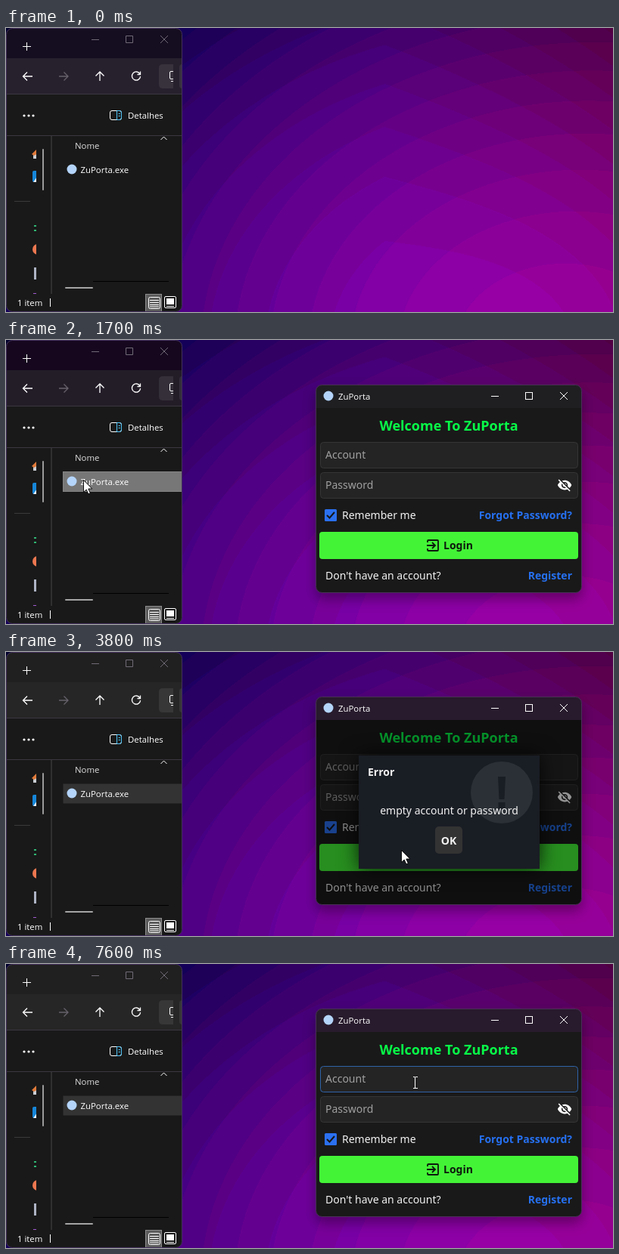
Animation of 802 by 376 pixels, one loop 8000 ms. Source, as an HTML page with a canvas:

```html
<!DOCTYPE html>
<html lang="en">
<head>
<meta charset="utf-8">
<title>Login demo</title>
<style>
html, body { margin: 0; width: 100%; height: 100%; overflow: hidden; background: #28005c; }
canvas, svg { position: absolute; left: 0; top: 0; width: 802px; height: 376px; }
text { font: 14px "Noto Sans", sans-serif; fill: #f2f2f2; }
.ui { font: 11.4px "Open Sans", sans-serif; fill: #fff; }
.b { font-weight: 700; }
.link { font-weight: 700; fill: #2670f0; text-anchor: end; }
.mid { text-anchor: middle; }
.hint { fill: #a0a0a0; }
.line { fill: none; stroke: #fff; }
.field { fill: #242424; stroke: #353535; }
#login { filter: drop-shadow(0 8px 8px #0005); }
#box { filter: drop-shadow(0 0 13px #000c); }
</style>
</head>
<body>
<canvas id="bg" width="802" height="376"></canvas>
<svg viewBox="0 0 802 376">
  <defs>
    <clipPath id="frame"><rect x=".5" y=".5" width="232" height="375" rx="8"/></clipPath>
    <clipPath id="side"><rect y="143" width="40" height="209"/></clipPath>
    <clipPath id="chip"><rect x="202" y="48" width="19" height="32"/></clipPath>
    <clipPath id="pane"><rect x="409.5" y="59.5" width="351" height="275" rx="8"/></clipPath>
    <clipPath id="btnClip"><rect x="414" y="254" width="342" height="36" rx="4"/></clipPath>
  </defs>

  <g clip-path="url(#frame)">
    <rect width="233" height="376" fill="#191919"/>
    <rect id="tabs" width="233" height="40"/>
    <rect id="bar" y="40" width="233" height="48"/>
    <path d="M0 87.5H233M0 142.5H233" stroke="#3b3740"/>
    <path class="line" d="M22 24.5H33M27.500 19V30"/>
    <path id="winBtns" class="line" d="M113 15.500H123M158.500 10.500H167.500V19.500H158.500ZM204 10L214 20M214 10L204 20"/>
    <g class="line" stroke-width="1.3">
      <path d="M35 64H22.500M28 58.500L22.500 64L28 69.500M124 70V58M118.500 63.500L124 58L129.500 63.500"/>
      <path d="M70 64H82M76.500 58.500L82 64L76.500 69.500" stroke="#66616b"/>
      <path d="M177 61A5.600 5.600 0 1 0 177.600 64M177.500 57.500V61.500H173.500"/>
    </g>
    <g fill="#fff" fill-opacity=".08">
      <path d="M207 48H221V80H207Q202 80 202 75V53Q202 48 207 48Z"/>
      <rect x="229" y="48" width="9" height="32" rx="4"/>
    </g>
    <path class="line" clip-path="url(#chip)" d="M224 57.500H218Q216.500 57.500 216.500 59V66Q216.500 67.500 218 67.500H224M218 70.500H224" stroke="#ddd"/>
    <g fill="#fff"><circle cx="24" cy="116" r="1.600"/><circle cx="30" cy="116" r="1.600"/><circle cx="36" cy="116" r="1.600"/></g>
    <rect class="line" x="137.500" y="109.500" width="15" height="12" rx="2.500" stroke="#d8e6ee"/>
    <path d="M146.500 109.500H150Q152.500 109.500 152.500 112V119Q152.500 121.500 150 121.500H146.500ZM148.500 113.500H151M148.500 116.500H151" fill="none" stroke="#4cc2f5"/>
    <text class="ui" x="161" y="120">Detalhes</text>
    <text class="ui" x="91" y="160" style="fill:#dedede">Nome</text>
    <path class="line" d="M204.500 148L208.500 144L212.500 148" stroke="#aaa"/>
    <rect x="59" y="143" width="2" height="209" fill="#303030"/>
    <g clip-path="url(#side)">
      <path d="M36 165H44V173H36Z" fill="#c9ccd2"/>
      <path d="M34 167L42 159V166L37 169Z" fill="#e07a3a"/>
      <rect x="35" y="189" width="12" height="15" rx="2" fill="#1687d9"/>
      <path d="M36 204L41 197V204Z" fill="#e9f4ff"/>
      <path d="M37 261H40V263H37ZM37 267H40V269H37Z" fill="#2fb573"/>
      <circle cx="42" cy="293" r="7" fill="#ec7750"/>
      <rect x="37" y="317" width="6" height="16" fill="#aeb4c4"/>
      <rect x="36" y="351" width="6" height="4" fill="#a05bd0"/>
    </g>
    <path d="M11 229.500H32" stroke="#3a3a3a"/>
    <rect x="48" y="160" width="2" height="55" rx="1" fill="#9a9a9a"/>
    <rect x="78" y="343" width="37" height="2" rx="1" fill="#a5a5a5"/>
    <path d="M115 335.500H215" stroke="#000"/>
    <rect id="row" x="75.500" y="174.500" width="160" height="26"/>
    <circle cx="87" cy="187" r="6.500" fill="#b4d4fa"/>
    <text class="ui" x="98.500" y="192">ZuPorta.exe</text>
    <text class="ui" x="15" y="368">1 item</text>
    <path class="line" d="M58.500 358V369"/>
    <rect x="184.500" y="352.500" width="21" height="23" fill="#5c5c5c" stroke="#8c8c8c"/>
    <rect class="line" x="188.500" y="356.500" width="15" height="15" rx="2"/>
    <path class="line" d="M190 360.500H202M190 363.500H202M190 366.500H202M190 369H202"/>
    <rect class="line" x="209.500" y="355.500" width="15" height="15" rx="1.500"/>
    <rect x="212" y="358" width="10" height="8" fill="#fff"/>
    <path class="line" d="M212 368.500H222" stroke="#999"/>
  </g>
  <rect x=".5" y=".5" width="232" height="375" rx="8" fill="none" stroke="#43305c"/>

  <g id="login">
    <g clip-path="url(#pane)">
      <rect x="409" y="59" width="352" height="276" fill="#191919"/>
      <rect id="caption" x="409" y="59" width="352" height="31"/>
      <circle cx="426" cy="74" r="6.500" fill="#b4d4fa"/>
      <text class="ui" x="439" y="79">ZuPorta</text>
      <path class="line" d="M641 74.500H651M732 69L742 79M742 69L732 79"/>
      <rect class="line" x="686.500" y="69.500" width="9" height="9" stroke="#5a5260"/>
      <text class="b mid" x="585" y="120" style="font-size:18px;fill:#08fa48">Welcome To ZuPorta</text>
      <rect id="account" class="field" x="415.500" y="135.500" width="340" height="34" rx="4"/>
      <rect class="field" x="415.500" y="175.500" width="340" height="34" rx="4"/>
      <text class="hint" x="422" y="157">Account</text>
      <text class="hint" x="422" y="197">Password</text>
      <rect id="caret" x="422" y="142" width="1" height="19" fill="#3a7cf0"/>
      <path transform="translate(728 182) scale(.84)" fill="#fff" d="M12 7c2.760 0 5 2.240 5 5 0 .65-.13 1.260-.36 1.830l2.920 2.920c1.510-1.260 2.700-2.890 3.430-4.750-1.730-4.390-6-7.500-11-7.500-1.400 0-2.740.25-3.980.7l2.160 2.160C10.740 7.130 11.350 7 12 7zM2 4.270l2.740 2.740C3.080 8.300 1.780 10.020 1 12c1.730 4.390 6 7.500 11 7.500 1.550 0 3.030-.3 4.380-.84L19.730 22 21 20.730 3.270 3zM7.530 9.800l1.550 1.550c-.05.21-.08.43-.08.65 0 1.660 1.340 3 3 3 .22 0 .44-.03.65-.08l1.550 1.550c-.67.33-1.410.53-2.200.53-2.760 0-5-2.240-5-5 0-.79.2-1.530.53-2.200zm4.310-.78l3.150 3.150.02-.16c0-1.660-1.340-3-3-3z"/>
      <rect x="421" y="224" width="16" height="16" rx="1.500" fill="#2b70f0"/>
      <path d="M424 232L427.500 235.500L434 228" fill="none" stroke="#151515" stroke-width="2"/>
      <text x="444" y="237">Remember me</text>
      <text class="link" x="748" y="237">Forgot Password?</text>
      <rect id="btn" x="414" y="254" width="342" height="36" rx="4"/>
      <circle id="ripple" cx="518" cy="270" fill="#fff" fill-opacity=".1" clip-path="url(#btnClip)"/>
      <path d="M557 268V266Q557 265 558 265H570Q571 265 571 266V278Q571 279 570 279H558Q557 279 557 278V276M556 272H566M563 268L567 272L563 276" fill="none" stroke="#0d1a0d" stroke-width="1.800"/>
      <text class="b" x="578" y="277" style="fill:#0d1a0d">Login</text>
      <text x="422" y="317">Don't have an account?</text>
      <text class="link" x="748" y="317">Register</text>
      <g id="dialog">
        <rect x="409" y="90" width="352" height="245" fill="#000" fill-opacity=".42"/>
        <rect id="box" x="466" y="137" width="239" height="150" fill="#191d24"/>
        <circle cx="655" cy="186" r="41" fill="#2b3036"/>
        <path d="M650 165H660L658.500 195H651.500ZM650.500 199H659.500V208H650.500Z" fill="#191d24"/>
        <text class="b" x="478" y="164">Error</text>
        <text class="mid" x="585.500" y="215">empty account or password</text>
        <rect x="567" y="231" width="36" height="36" rx="5" fill="#333"/>
        <text class="b mid" x="585" y="255">OK</text>
      </g>
    </g>
    <rect x="409.500" y="59.500" width="351" height="275" rx="8" fill="none" stroke="#4a3058"/>
  </g>

  <path id="arrow" d="M.5 .5V16.500L4.200 13L6.800 18.800L9.300 17.700L6.800 12H11.800Z" fill="#fff" stroke="#000" stroke-width=".9"/>
  <path id="beam" d="M-3 -7.500H-1L-.5 -7L0 -7.500H3M-.5 -7V7M-3 7.500H3" fill="none" stroke="#fff"/>
</svg>
<script>
const $ = id => document.getElementById(id);
const LOOP = 8000, STEP = 100;

// Wallpaper: a banded glow, bluer on the left and redder on the right
function paintWallpaper() {
  const ctx = $('bg').getContext('2d'), img = ctx.createImageData(802, 376);
  const band = (v, size) => Math.round(v / size) * size;
  for (let y = 0, i = 0; y < 376; y++) for (let x = 0; x < 802; x++, i += 4) {
    const glow = 1 - Math.hypot((x - 680) / 680, (y - 420) / 530) ** 1.6;
    const warm = Math.min(1, Math.max(0, (x - 500) / 300));
    img.data[i] = band(38 + 108 * glow + (x - 520) * .04, 10);
    img.data[i + 2] = band((88 + 90 * glow) * (1 - warm * (.1 + .4 * (1 - glow))), 11);
    img.data[i + 3] = 255;
  }
  ctx.putImageData(img, 0, 0);
}

// Pointer stops: time, x, y
const PATH = [
  [100, 150, -20], [900, 102, 185], [2100, 102, 185], [2800, 482, 230], [2900, 482, 230],
  [3100, 522, 262], [4600, 522, 262], [4800, 579, 261], [4900, 579, 261], [5100, 578, 258],
  [6100, 578, 258], [6500, 547, 171], [6800, 542, 157], [7300, 542, 157], [7400, 541, 157]
];
// Window colours: time, tab strip, toolbar, login caption
const TINTS = [
  [0, '#150d20', '#27202d', '#1f1f22'], [1500, '#13002a', '#241a30', '#1f1f22'],
  [1700, '#16071f', '#231d28', '#1f1f22'], [1800, '#1c151f', '#252226', '#241d28'],
  [1900, '#202020', '#262626', '#281b2d']
];

function pointer(t) {
  const i = PATH.findIndex(p => p[0] > t);
  if (i === 0) return PATH[0].slice(1);
  if (i < 0) return PATH.at(-1).slice(1);
  const [t0, x0, y0] = PATH[i - 1], [t1, x1, y1] = PATH[i];
  const u = (t - t0) / (t1 - t0), k = u * u * (3 - 2 * u);
  return [x0 + (x1 - x0) * k, y0 + (y1 - y0) * k].map(Math.round);
}

const set = (id, name, value) => $(id).setAttribute(name, value);
const show = (id, on) => set(id, 'visibility', on ? 'visible' : 'hidden');

function draw(t) {
  const [x, y] = pointer(t);
  const over = (x0, y0, x1, y1) => x >= x0 && x <= x1 && y >= y0 && y <= y1;
  const between = (a, b) => t >= a && t < b;
  const open = t >= 1700, modal = between(3800, 5400), selected = t >= 1100;

  const tint = TINTS.findLast(c => c[0] <= t);
  ['tabs', 'bar', 'caption'].forEach((id, i) => set(id, 'fill', tint[i + 1]));
  $('winBtns').style.stroke = between(1200, 1700) ? '#fff' : '#706a76';

  const rowHover = over(76, 175, 232, 200);
  set('row', 'fill', selected ? (rowHover ? '#777' : '#333') : rowHover ? '#4a4a4a' : 'none');
  set('row', 'stroke', selected && rowHover ? '#858585' : 'none');

  $('login').style.display = open ? '' : 'none';
  $('dialog').style.display = modal ? '' : 'none';
  set('btn', 'fill', !modal && over(414, 254, 756, 290) ? '#50f840' : '#43f436');
  set('ripple', 'r', between(3200, 3800) ? Math.min(82, (t - 3100) * .164) : 0);
  $('account').style.stroke = t >= 6800 ? '#2f63a8' : '';
  set('caret', 'opacity', between(7000, 7100) ? .5 : between(7100, 7600) ? 1 : 0);

  const typing = open && !modal && (over(415, 135, 756, 170) || over(415, 175, 756, 210));
  show('arrow', !typing && t >= 200);
  show('beam', typing);
  for (const id of ['arrow', 'beam']) set(id, 'transform', `translate(${x} ${y})`);
}

function frame(now) {
  draw(Math.floor(now % LOOP / STEP) * STEP);
  requestAnimationFrame(frame);
}

paintWallpaper();
draw(0);
requestAnimationFrame(frame);
</script>
</body>
</html>
```
